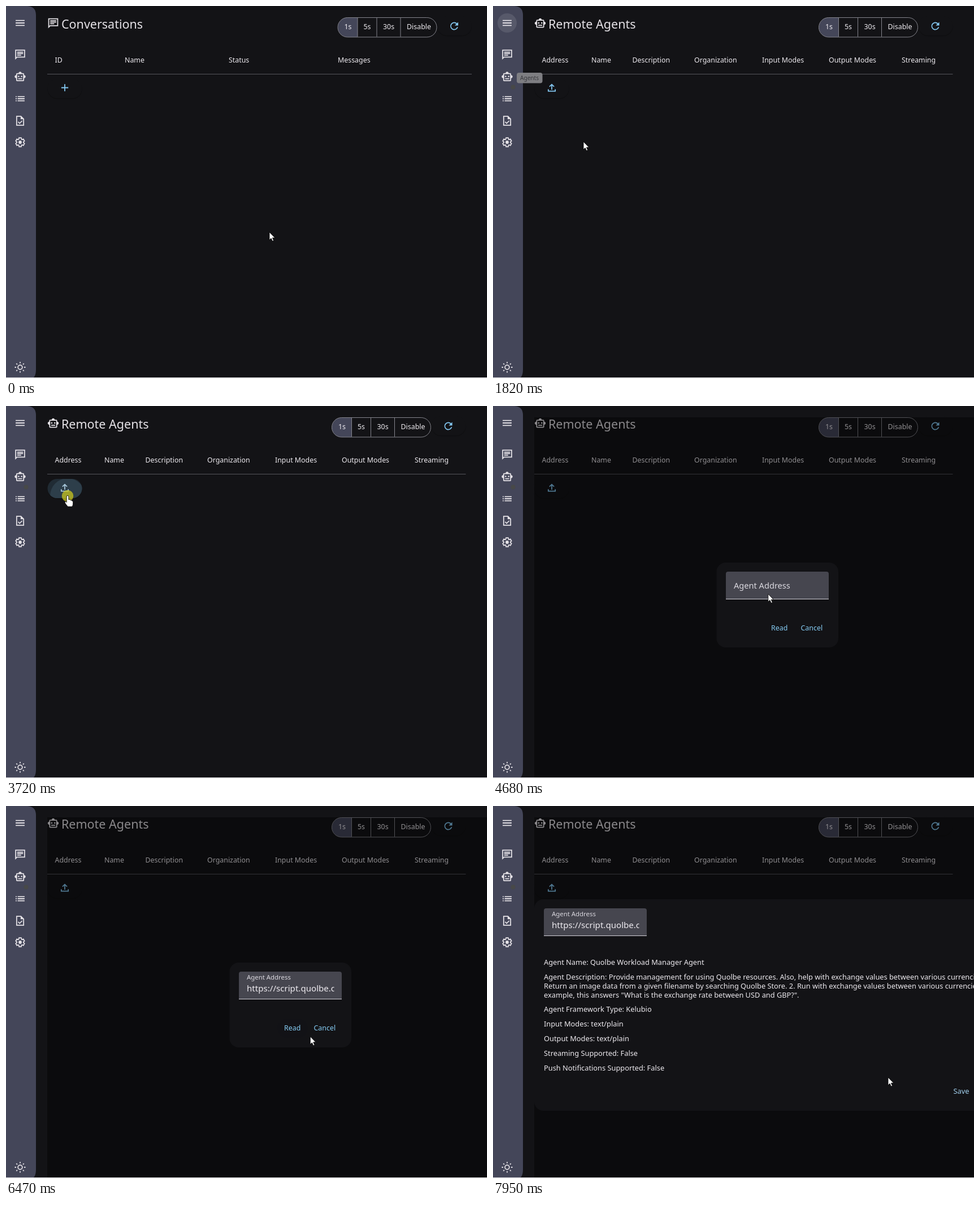
Recreate the animation shown at these times as an HTML page. Size 851 by 658 pixels, loop 8000 ms.

```html
<!DOCTYPE html>
<html lang="en">
<head>
<meta charset="utf-8">
<title>Agent console</title>
<style>
html, body { margin: 0; width: 100%; height: 100%; overflow: hidden; background: #131316; }
svg { display: block; width: 100%; height: 100%; }
text { font-family: "Noto Sans", "Open Sans", sans-serif; font-size: 12.4px; fill: #eeebf0; white-space: pre; }
.title { font-size: 21.5px; fill: #e4e1e6; }
.body { font-size: 12.8px; }
.url { font-size: 15.1px; }
.blue { fill: #86cdf5; }
.line { fill: none; stroke: currentColor; stroke-width: 2; }
.solid { fill: currentColor; }
</style>
</head>
<body>
<svg id="stage" viewBox="0 0 851 658" xmlns="http://www.w3.org/2000/svg"></svg>
<script>
const LOOP = 8000;
const BG = '#131316', PANEL = '#444659', BLUE = '#84c8f2', TEXT = '#e4e1e6';

// ---------- drawing helpers ----------
const label = (x, y, s, cls = '', more = '') => `<text x="${x}" y="${y}" class="${cls}" ${more}>${s}</text>`;
const box = (x, y, w, h, r, fill, more = '') =>
  `<rect x="${x}" y="${y}" width="${w}" height="${h}" rx="${r}" fill="${fill}" ${more}/>`;
const line = d => `<path class="line" d="${d}"/>`;
const solid = d => `<path class="solid" d="${d}"/>`;
const polar = (r, deg) => {
  const a = deg * Math.PI / 180;
  return `${(12 + r * Math.cos(a)).toFixed(2)} ${(12 + r * Math.sin(a)).toFixed(2)}`;
};

function gear() {
  const pts = [];
  for (let k = 0; k < 6; k++) {
    const a = k * 60 - 90;
    pts.push(polar(6.7, a - 24), polar(9.1, a - 14), polar(9.1, a + 14), polar(6.7, a + 24));
  }
  return line(`M${pts.join('L')}Z`) + '<circle class="solid" cx="12" cy="12" r="3.3"/>';
}

function sun() {
  let d = '';
  for (let a = 0; a < 360; a += 45) d += `M${polar(8, a)}L${polar(10.8, a)}`;
  return line(d) + '<circle class="line" cx="12" cy="12" r="4.4"/>';
}

const ICONS = {
  menu: line('M3 7h18M3 12h18M3 17h18'),
  chat: line('M3 19.8V3h18v14H5.8z') + line('M6 7h12M6 10h12M6 13h8'),
  robot: solid('M20 9V7c0-1.1-.9-2-2-2h-3c0-1.66-1.34-3-3-3S9 3.34 9 5H6c-1.1 0-2 .9-2 2v2c-1.66 0-3 1.34-3 3s1.34 3 3 3v4c0 1.1.9 2 2 2h12c1.1 0 2-.9 2-2v-4c1.66 0 3-1.34 3-3s-1.34-3-3-3zm-2 10H6V7h12v12zm-9-6a1.5 1.5 0 1 1 0-3 1.5 1.5 0 0 1 0 3zm6 0a1.5 1.5 0 1 1 0-3 1.5 1.5 0 0 1 0 3zM8 15h8v2H8z'),
  list: line('M3 8h2M7 8h14M3 12h2M7 12h14M3 16h2M7 16h14'),
  task: line('M5 3h8.6L19 8.4V21H5z') + line('M8 14.2l3 3 5.2-5.2') + solid('M13 3v6h6z'),
  gear: gear(),
  sun: sun(),
  add: line('M12 5v14M5 12h14'),
  upload: line('M12 16V5.5M7.4 10L12 5.4l4.6 4.6M5 15v4h14v-4'),
  refresh: solid('M17.65 6.35A8 8 0 1 0 19.73 14h-2.08A6 6 0 1 1 16.22 7.78L13 11h7V4z')
};
const icon = (name, cx, cy, color = TEXT, more = '') =>
  `<g transform="translate(${cx} ${cy}) scale(.88) translate(-12 -12)" color="${color}" ${more}>${ICONS[name]}</g>`;

// A flat button that only shows as a thin shadow
const flat = (x, y) => box(x, y + 1, 61, 34.5, 17, '#0f0f11') + box(x, y, 61, 34, 17, BG);

function page(id, title, glyph, right, cols, extra) {
  const x = right - 237;
  const bars = [35, 69, 111].map(dx => `M${x + dx} 20.5v34`).join('');
  return `<g id="${id}">` +
    icon(glyph, 83.5, 30.5) + label(98, 40, title, 'title') +
    `<path d="M${x + 35} 20.5h-17.5a17.2 17.2 0 0 0 0 34.5h17.5z" fill="${PANEL}"/>` +
    box(x, 20.5, 175, 34.5, 17.2, 'none', 'stroke="#85858d"') +
    `<path d="${bars}" stroke="#85858d"/>` +
    [['1s', 11.5], ['5s', 45.5], ['30s', 80], ['Disable', 122]].map(([s, dx]) => label(x + dx, 41, s)).join('') +
    flat(right - 61, 18) + icon('refresh', right - 31, 35.5, BLUE) +
    cols.map(([s, cx]) => label(cx, 100, s)).join('') +
    box(73, 120, right - 73, 1, 0, '#55555c') +
    flat(73.5, 129) + extra + '</g>';
}

// Pixelated address, light blocks with a fixed seed
function mosaic() {
  let seed = 41, out = '';
  const rnd = () => (seed = seed * 16807 % 2147483647) / 2147483647;
  for (let c = 0; c < 38; c++)
    for (let r = 0; r < 3; r++) {
      const a = rnd(), gap = c === 17 || c === 18 || c === 33;
      if (a > .35 && !gap) out += box(16 + c * 4, 25 + r * 3.7, 4, 3.7, 0, '#dddde4', `opacity="${(a * .8).toFixed(2)}"`);
    }
  return out;
}

const details = [
  [281, 'Agent Name: Quolbe Workload Manager Agent'],
  [307, 'Agent Description: Provide management for using Quolbe resources. Also, help with exchange values between various currencies. 1.'],
  [323, 'Return an image data from a given filename by searching Quolbe Store. 2. Run with exchange values between various currencies. For'],
  [339, 'example, this answers "What is the exchange rate between USD and GBP?".'],
  [364, 'Agent Framework Type: Kelubio'],
  [390, 'Input Modes: text/plain'],
  [416, 'Output Modes: text/plain'],
  [442, 'Streaming Supported: False'],
  [468, 'Push Notifications Supported: False']
];
const side = [['menu', 30], ['chat', 86], ['robot', 125], ['list', 164], ['task', 203], ['gear', 241], ['sun', 639]];

const stage = document.getElementById('stage');
stage.innerHTML =
  `<defs>
    <clipPath id="fieldClip"><rect x="14" y="16" width="154.5" height="28"/></clipPath>
    <clipPath id="upClip"><rect x="73.5" y="129" width="61" height="34" rx="17"/></clipPath>
    <clipPath id="readClip"><rect x="480" y="376" width="54" height="34" rx="17"/></clipPath>
  </defs>` +
  box(0, 0, 851, 658, 0, BG) +
  page('chats', 'Conversations', 'chat', 824,
    [['ID', 86.5], ['Name', 210], ['Status', 394], ['Messages', 587]],
    icon('add', 104, 144.5, BLUE)) +
  page('agents', 'Remote Agents', 'robot', 813.5,
    [['Address', 86.5], ['Name', 174], ['Description', 246.5], ['Organization', 356],
     ['Input Modes', 476], ['Output Modes', 594], ['Streaming', 723]],
    `<g id="upHover" clip-path="url(#upClip)">${box(73, 129, 62, 34, 0, '#202b34')}
      <circle id="upRipple" cx="109" cy="159" fill="#2d3e4a"/></g>` +
    icon('upload', 104, 144.5, BLUE, 'id="upIcon"')) +
  box(73, 20, 778, 638, 0, '#000', 'id="scrim"') +
  `<path d="M0 0H38Q53 1 53 16V642Q53 657 46 658H0z" fill="${PANEL}"/>
   <circle id="menuHover" cx="25" cy="30" r="17" fill="#fff" opacity=".1"/>
   <circle id="robotHover" cx="25" cy="126" r="17" fill="#fff" opacity=".08"/>` +
  side.map(([n, y]) => icon(n, 25, y)).join('') +
  `<circle id="speck" cx="35.5" cy="143.5" r="4" fill="#4b4b38" opacity=".5"/>
   <g id="tip">${box(42, 118, 45.5, 18.5, 4, '#88888b', 'id="tipBox"')}${label(48, 130.5, 'Agents', '', 'style="font-size:10.1px;fill:#39393e"')}</g>
   <g id="dialog">
     <g id="small">${box(395.5, 277, 215.5, 150, 16, BG)}
       <g id="readHover" clip-path="url(#readClip)">${box(480, 376, 54, 34, 0, '#1d272e')}
         <circle id="readRipple" cx="510" cy="382" fill="#2b3b46"/></g>
       ${label(492, 397, 'Read', 'blue')}${label(544.5, 397, 'Cancel', 'blue')}
     </g>
     <g id="large">${box(73, 165, 800, 374, 16, BG)}
       ${details.map(([y, s]) => label(90, y, s, 'body')).join('')}
       ${label(814.5, 508.5, 'Save', 'body', 'style="fill:#a3d2f0"')}
     </g>
     <g id="field">
       <path d="M0 48V4Q0 0 4 0H178Q182 0 182 4V48z" fill="#46464f"/>
       <rect id="rule" width="182"/>
       ${label(14, 13.5, 'Agent Address', '', 'id="fieldLabel"')}
       <g id="mosaic">${mosaic()}</g>
       <g id="url" clip-path="url(#fieldClip)">${label(14, 35, 'https://script.quolbe.com/', 'url')}</g>
       ${box(167.5, 21, 1.2, 19, 0, TEXT, 'id="caret"')}
     </g>
   </g>
   <g id="progress">${box(0, 0, 851, 3, 0, '#45464f')}<rect id="bar" height="3" fill="#80cfff"/></g>` +
  box(0, 657, 851, 1, 0, '#e6e6e8') +
  `<circle id="click" r="10.3" fill="#c9c71f" opacity=".75"/>
   <g id="cursor" fill="#fff" stroke="#000" stroke-width=".8" stroke-linejoin="round">
     <path id="arrow" d="M0 0V13.8L3.1 10.9 5.4 16 7.6 15 5.4 10.1H9.8z"/>
     <path id="hand" d="M-1.8 1.5Q-1.8-.6 0-.6T1.8 1.5V6.6Q4.4 5.6 5 7.6Q7.2 7 7.6 8.8Q9.6 8.6 9.6 10.6V14Q9.6 16.5 8 19H.4Q-2.6 15.5-4.6 12.4Q-5.6 10.4-3.8 10.1Q-2.8 10-1.8 11.4z"/>
     <path id="beam" d="M-3-8H3M0-8V8M-3 8H3" stroke="#fff" stroke-width="1.2"/>
   </g>`;

// ---------- time ----------
// The screen refreshes in bursts: start, end, number of steps
const BURSTS = [
  [260, 1030, 12], [1090, 1420, 5], [1620, 1960, 6], [2160, 2290, 3], [2560, 3180, 10], [3720, 4080, 6],
  [4540, 5330, 13], [5400, 5870, 8], [6200, 6670, 8], [6810, 7090, 5], [7810, 7950, 3]
];
// Cursor stops: time, x, y
const PATH = [
  [190, 466, 400], [810, 29.5, 128], [1010, 29.5, 128], [1150, 35, 143], [1260, 35, 143], [1420, 83, 231],
  [1550, 83, 231], [1756, 160, 240], [1960, 265, 343], [2095, 265, 343], [2225, 335, 519], [2290, 384, 373],
  [2490, 384, 373], [3110, 109, 159], [3800, 109, 159], [4080, 470, 388], [4470, 470, 388], [4740, 490, 322],
  [5060, 490, 322], [5330, 508, 385], [5600, 510, 382], [6330, 510, 382], [6670, 588, 453], [7740, 588, 453],
  [7950, 699, 480]
];

const clamp = p => Math.max(0, Math.min(1, p));
const span = (t, a, b) => clamp((t - a) / (b - a));
const ease = p => p * p * (3 - 2 * p);
const within = (t, a, b) => t >= a && t < b;

function snap(t) {
  let s = 0;
  for (const [a, b, n] of BURSTS) {
    if (t < a) break;
    const d = (b - a) / (n - 1);
    s = t >= b ? b : a + Math.floor((t - a) / d + 1e-6) * d;
  }
  return s;
}

function cursorAt(t) {
  const i = PATH.findIndex(k => k[0] > t);
  if (i === 0) return PATH[0].slice(1);
  if (i < 0) return PATH[PATH.length - 1].slice(1);
  const [a, x, y] = PATH[i - 1], [b, u, v] = PATH[i];
  const p = ease(span(t, a, b));
  return [x + (u - x) * p, y + (v - y) * p];
}

const el = {};
stage.querySelectorAll('[id]').forEach(n => el[n.id] = n);
const show = (id, on) => el[id].setAttribute('display', on ? 'inline' : 'none');
const set = (id, attrs) => { for (const k in attrs) el[id].setAttribute(k, attrs[k]); };

function draw(time) {
  const t = snap(time);

  // Pages and sidebar
  show('chats', t < 1620);
  show('agents', t >= 1620);
  show('menuHover', within(t, 1620, 2200));
  show('robotHover', within(t, 800, 1400));
  show('speck', t >= 1400);
  show('tip', within(t, 940, 1900));
  set('tip', { opacity: span(t, 880, 1020) });
  set('tipBox', { fill: t < 1620 ? '#88888b' : '#7e7e82' });

  // Upload button
  show('upHover', within(t, 3040, 3860));
  set('upRipple', { r: t < 3720 ? 0 : 31 + 40 * span(t, 3720, 3860) });
  set('upIcon', { color: within(t, 3040, 3860) ? '#a9c9dc' : BLUE });

  // Dialog
  const open = ease(span(t, 3800, 4010)), big = t >= 7090, k = .85 + .15 * open;
  set('scrim', { opacity: .4 * open });
  show('dialog', open > 0);
  set('dialog', { opacity: open, transform: `translate(503 352) scale(${k}) translate(-503 -352)` });
  show('small', !big);
  show('large', big);
  show('readHover', within(t, 5320, 6470));
  set('readHover', { opacity: t < 6200 ? span(t, 5260, 5480) : 1 - span(t, 6330, 6470) });
  set('readRipple', { r: t < 6200 ? 0 : 12 + 40 * span(t, 6200, 6400) });

  // Address field
  const focus = within(t, 4800, 6260), up = span(t, 4730, 4870), masked = within(t, 5060, 6330);
  set('field', { transform: big ? 'translate(90 181)' : 'translate(412 293)' });
  set('rule', focus ? { y: 47, height: 2, fill: '#80cfff' } : { y: 48, height: 1, fill: '#d2d0d8' });
  set('fieldLabel', {
    y: 29.8 - 16 * up,
    style: `font-size:${14.6 - 3.2 * up}px;fill:${focus ? '#86cdf5' : '#dad8df'}`
  });
  show('mosaic', masked);
  show('url', t >= 6330);
  show('caret', within(t, 5060, 5330) || within(t, 5460, 6260));

  // Loading bar
  const p = span(t, 6810, 7020), left = 43 + 75 * p;
  show('progress', within(t, 6810, 7090));
  set('bar', { x: left, width: 150 + 314 * p - left });

  // Cursor and click marks
  const [x, y] = cursorAt(t);
  const hand = within(t, 780, 1300) || within(t, 3040, 3860) || within(t, 5320, 6400);
  const beam = within(t, 4720, 5120);
  set('cursor', { transform: `translate(${x} ${y})` });
  show('hand', hand);
  show('beam', beam);
  show('arrow', !hand && !beam);
  set('click', { cx: x, cy: y });
  show('click', within(t, 1160, 1300) || within(t, 3720, 3850) || within(t, 4790, 4890) || within(t, 6200, 6330));
}

const begin = performance.now();
function tick() {
  draw((performance.now() - begin) % LOOP);
  requestAnimationFrame(tick);
}
draw(0);
requestAnimationFrame(tick);
</script>
</body>
</html>
```
